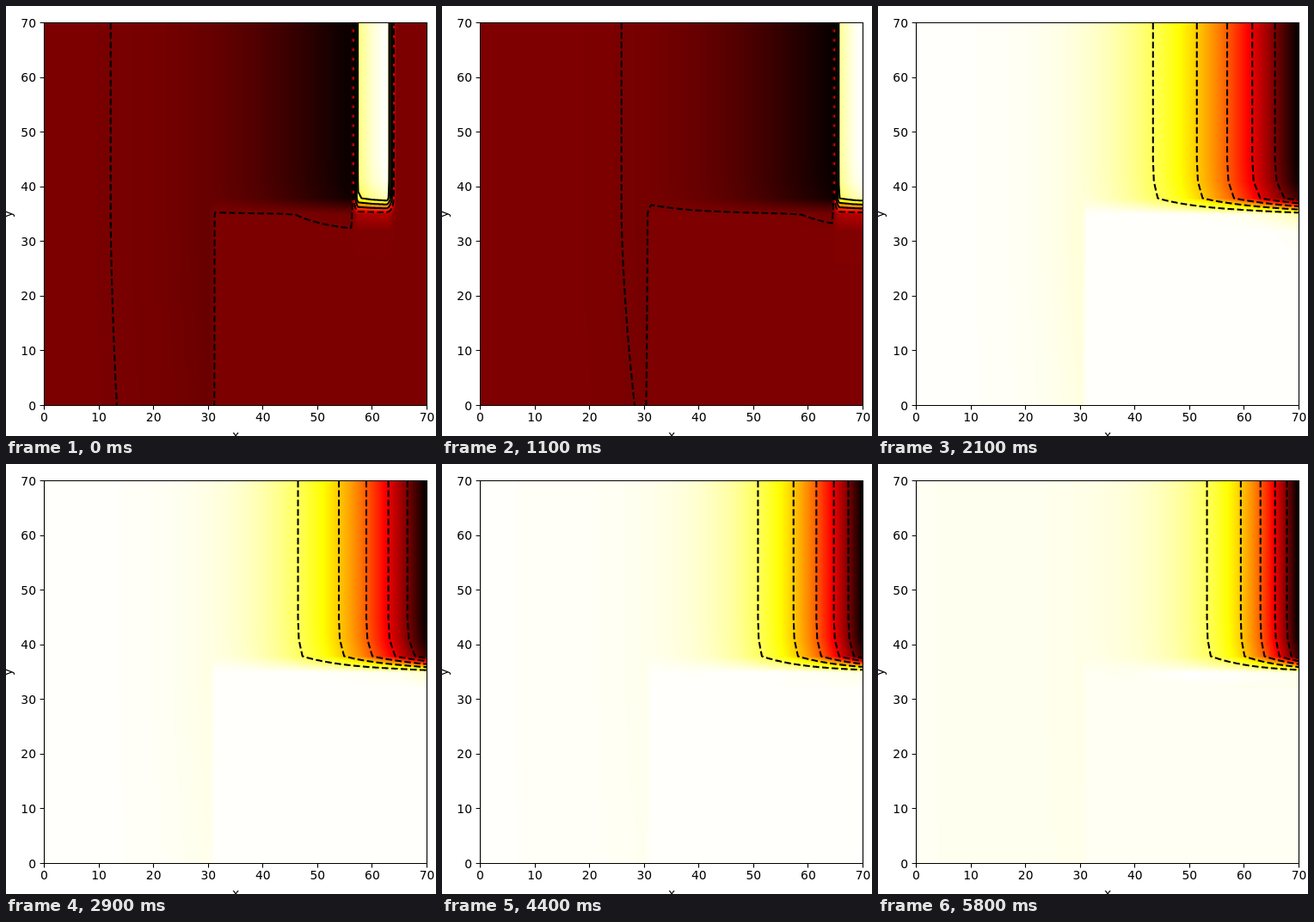
Write an HTML page with a canvas that moves like this. It is 500x500 px and loops after 5.9 s.

```html
<!DOCTYPE html>
<html lang="en">
<head>
<meta charset="utf-8">
<title>Travelling pulse</title>
<style>
  html, body { margin: 0; width: 100%; height: 100%; overflow: hidden; background: #fff; }
  canvas, svg { position: absolute; left: 0; top: 0; width: 500px; height: 500px; }
  text { font: 13.89px "DejaVu Sans", Verdana, sans-serif; fill: #000; }
</style>
</head>
<body>
<canvas id="plot" width="500" height="500"></canvas>
<svg id="axes" viewBox="0 0 500 500"></svg>
<script>
const LEFT = 44, TOP = 19, N = 446, SPAN = 70;
const STEPS = 59, STEP_MS = 100;
const PULSE = 5.83;          // pulse height in units of the trough depth
const SOLID_ABOVE = 1.4;     // higher contour levels are drawn unbroken

const ctx = document.getElementById('plot').getContext('2d');
const img = ctx.createImageData(N, N);
const field = new Float32Array(N * N);
const clamp = (v, a = 0, b = 1) => Math.min(b, Math.max(a, v));

// Linear interpolation through [x, value] points sorted by x.
function lerp(points, x) {
  if (x <= points[0][0]) return points[0][1];
  for (let k = 1; k < points.length; k++) {
    const [b, vb] = points[k];
    if (x <= b) {
      const [a, va] = points[k - 1];
      return va + (vb - va) * (x - a) / (b - a);
    }
  }
  return points[points.length - 1][1];
}

// The "hot" colour map in 256 steps.
const palette = Array.from({ length: 256 }, (_, i) => {
  const v = i / 255;
  return [
    0.0416 + 0.9584 * v / 0.365,
    (v - 0.365) / 0.381,
    (v - 0.746) / 0.254
  ].map(c => Math.round(255 * clamp(c)));
});

// Wave profile by distance d behind the trailing edge.
const pulseShape = [
  [-7.4, 1 / PULSE], [-7, 0.3], [-6.1, 0.83], [-5.7, 1],
  [-3, 0.95], [-0.4, 0.87], [0.9, 0]
];
function decay(d) {
  const near = Math.min(d, 41);
  return 0.0348 * near + 0.001045 * near * near + 0.12 * (d - near);
}
function wave(d) {
  return d < 0.9 ? lerp(pulseShape, d) * PULSE - 1 : -Math.exp(decay(0.9) - decay(d));
}

// Share of the wave that reaches height y.
function heightCurve(d) {
  const low = d < 0 ? 0.004 : 0.015 * Math.max(0, 1 - d / 10);
  const mid = clamp(0.1 - 0.005 * d, 0.03, 0.1);
  return [[26, 0], [31.9, low], [35, mid], [37.9, 0.92], [41, 0.985], [45, 1]];
}

function computeField(step) {
  const front = 57 + 0.75 * step;
  const gone = step >= 18;
  const bump = gone ? 0.0017 + 0.002 * Math.exp((21 - step) / 20) : 0;
  let lo = 0, hi = bump;
  for (let i = 0; i < N; i++) {
    const x = i * SPAN / (N - 1);
    const d = front - Math.min(x, 69.63);
    const w = wave(d);
    const curve = heightCurve(d);
    const column = clamp((31.3 - x) / 1.2);
    const ridge = bump * clamp((x - 40) / 10);
    lo = Math.min(lo, w);
    hi = Math.max(hi, w);
    for (let j = 0; j < N; j++) {
      const y = SPAN - j * SPAN / (N - 1);
      const s = lerp(curve, y);
      const lag = column && y < 35 ? 0.085 * x * (1 - y / 35) ** 1.5 : 0;
      let u = (lag ? wave(d + lag) : w) * (s + (1 - s) * column);
      if (ridge) u += ridge * Math.exp(-(((y - 34.3) / 1.1) ** 2));
      field[j * N + i] = u;
    }
  }
  return [lo, hi];
}

function paintField(lo, hi) {
  const scale = 256 / (hi - lo);
  for (let k = 0; k < field.length; k++) {
    const c = palette[clamp(Math.floor((field[k] - lo) * scale), 0, 255)];
    img.data[4 * k] = c[0];
    img.data[4 * k + 1] = c[1];
    img.data[4 * k + 2] = c[2];
    img.data[4 * k + 3] = 255;
  }
  ctx.putImageData(img, LEFT, TOP);
}

// Marching squares; an edge id is 2 * node, plus 1 for a vertical edge.
function contourLinks(level) {
  const links = new Map();
  const add = (a, b) => links.has(a) ? links.get(a).push(b) : links.set(a, [b]);
  for (let j = 0; j < N - 1; j++) {
    for (let i = 0; i < N - 1; i++) {
      const n = j * N + i;
      const a = field[n] > level, b = field[n + 1] > level;
      const c = field[n + N + 1] > level, e = field[n + N] > level;
      if (a === b && b === c && c === e) continue;
      const cuts = [];
      if (a !== b) cuts.push(2 * n);
      if (b !== c) cuts.push(2 * (n + 1) + 1);
      if (c !== e) cuts.push(2 * (n + N));
      if (e !== a) cuts.push(2 * n + 1);
      for (let k = 0; k < cuts.length; k += 2) {
        add(cuts[k], cuts[k + 1]);
        add(cuts[k + 1], cuts[k]);
      }
    }
  }
  return links;
}

function edgePoint(id, level) {
  const n = id >> 1, vertical = id & 1;
  const a = field[n], b = field[n + (vertical ? N : 1)];
  const t = (level - a) / (b - a);
  const x = n % N, y = Math.floor(n / N);
  return [LEFT + 0.5 + x + (vertical ? 0 : t), TOP + 0.5 + y + (vertical ? t : 0)];
}

function drawContour(level) {
  const links = contourLinks(level);
  const ids = [...links.keys()];
  const seen = new Set();
  ctx.setLineDash(level > SOLID_ABOVE ? [] : [7.7, 3.33]);
  for (const start of [...ids.filter(id => links.get(id).length === 1), ...ids]) {
    if (seen.has(start)) continue;
    ctx.beginPath();
    let id = start, last = start, count = 0;
    while (id !== undefined) {
      seen.add(id);
      ctx.lineTo(...edgePoint(id, level));
      last = id;
      count++;
      id = links.get(id).find(next => !seen.has(next));
    }
    if (count > 2 && links.get(last).includes(start)) ctx.closePath();
    ctx.stroke();
  }
}

function draw(step) {
  const [lo, hi] = computeField(step);
  ctx.clearRect(0, 0, 500, 500);
  paintField(lo, hi);
  ctx.save();
  ctx.beginPath();
  ctx.rect(LEFT + 0.5, TOP + 0.5, N - 1, N - 1);
  ctx.clip();
  ctx.lineWidth = 2.08;
  ctx.lineJoin = 'round';
  ctx.strokeStyle = '#000';
  for (let k = 1; k < 6; k++) drawContour(lo + (hi - lo) * k / 6);
  ctx.restore();
}

function buildAxes() {
  let ticks = '', labels = '';
  for (let v = 0; v <= SPAN; v += 10) {
    const off = v / SPAN * (N - 1);
    const x = Math.round(44 + off) + 0.5, y = Math.round(464 - off) + 0.5;
    ticks += `M${x} 464.5v4.9M44.5 ${y}h-4.9`;
    labels += `<text x="${44.5 + off}" y="483" text-anchor="middle">${v}</text>`
      + `<text x="35" y="${469.5 - off}" text-anchor="end">${v}</text>`;
  }
  document.getElementById('axes').innerHTML =
    `<path d="M44.5 19.5h445v445h-445z${ticks}" fill="none" stroke="#000" stroke-width="1.11"/>`
    + labels
    + '<text x="267" y="504" text-anchor="middle">x</text>'
    + '<text transform="translate(6.5 242) rotate(-90)" text-anchor="middle">y</text>';
}

let begin, shown = -1;
function tick(now) {
  begin ??= now;
  const step = Math.floor((now - begin) / STEP_MS) % STEPS;
  if (step !== shown) draw(shown = step);
  requestAnimationFrame(tick);
}

buildAxes();
draw(0);
requestAnimationFrame(tick);
</script>
</body>
</html>
```
